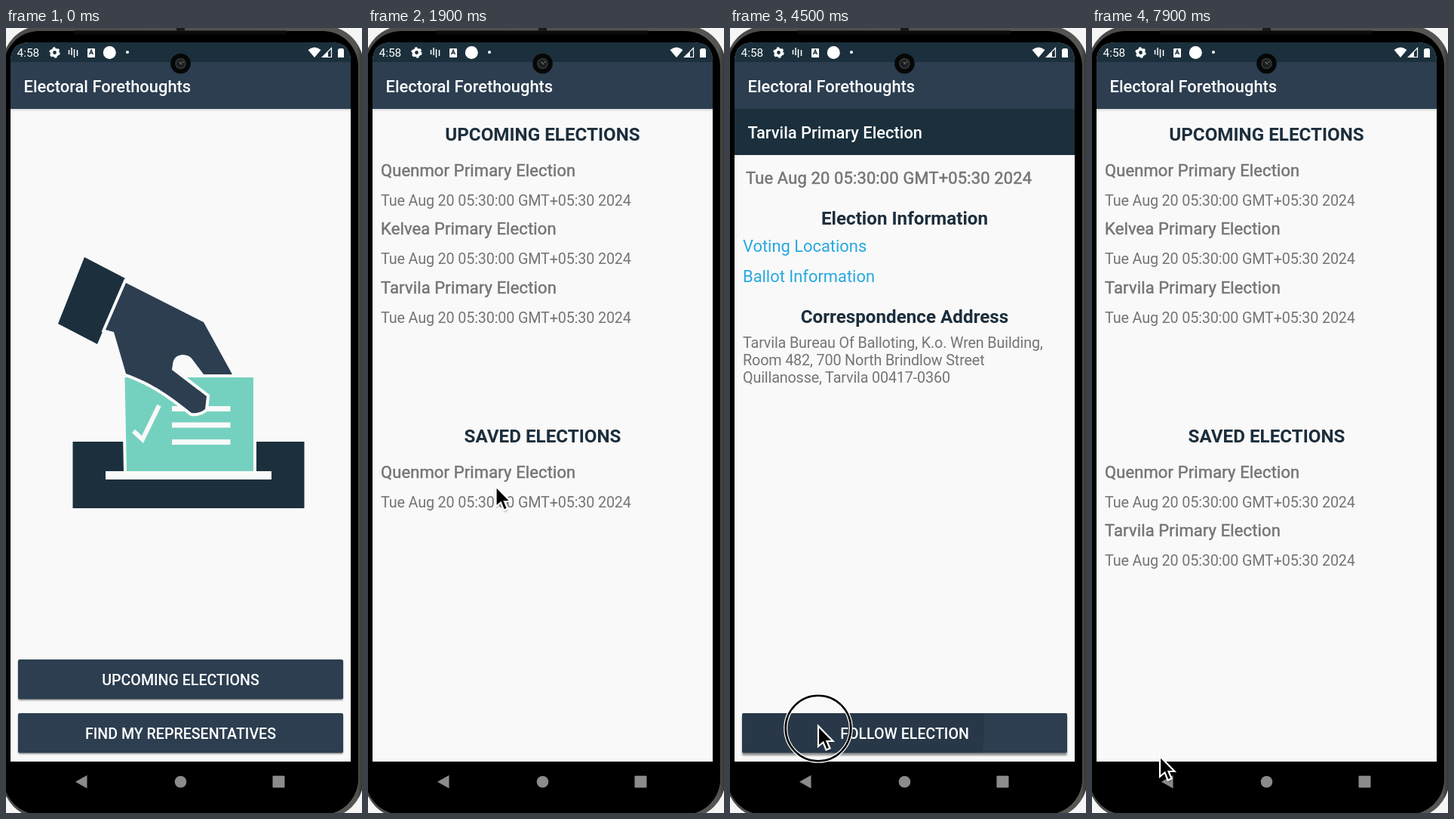
These frames come from a looping animation (472x1038 px, 8 s). An HTML page:

```html
<!DOCTYPE html>
<html lang="en">
<head>
<meta charset="utf-8">
<title>Election app walkthrough</title>
<style>
html, body { margin: 0; width: 100%; height: 100%; overflow: hidden; background: #f5f5f5; }
svg { display: block; width: 100%; height: 100%; font-family: Roboto, sans-serif; }
text { white-space: pre; }
.title { font-size: 21.9px; font-weight: 500; fill: #fff; }
.label { font-size: 19.6px; font-weight: 500; fill: #fff; text-anchor: middle; }
.head { font-size: 24.2px; font-weight: 700; fill: #1c2e3c; text-anchor: middle; }
.link { font-size: 21.9px; fill: #27a9e0; }
.body { font-size: 19.75px; fill: #757575; letter-spacing: -.15px; }
.strong { font-size: 21.9px; fill: #757575; stroke: #757575; stroke-width: .5px; letter-spacing: .17px; }
</style>
</head>
<body>
<svg id="stage" viewBox="0 0 472 1038" preserveAspectRatio="none">
  <defs>
    <linearGradient id="rim" x1="0" x2="1">
      <stop offset="0" stop-color="#30312f"/><stop offset=".02" stop-color="#4b4c4a"/>
      <stop offset=".98" stop-color="#555653"/><stop offset="1" stop-color="#2f302e"/>
    </linearGradient>
    <linearGradient id="drop" x1="0" x2="0" y1="0" y2="1">
      <stop offset="0" stop-color="#000" stop-opacity=".13"/><stop offset="1" stop-color="#000" stop-opacity="0"/>
    </linearGradient>
    <clipPath id="screen"><path d="M6 970V45Q6 19 32 19H431Q457 19 457 45V970Z"/></clipPath>
    <filter id="soft" x="-10%" y="-40%" width="120%" height="190%"><feGaussianBlur stdDeviation="1.3"/></filter>
    <filter id="blur" x="-50%" y="-50%" width="200%" height="200%"><feGaussianBlur stdDeviation="1.6"/></filter>
  </defs>

  <rect width="472" height="1038" fill="#f5f5f5"/>
  <rect x="-5" y="-3" width="479" height="1048" rx="52" fill="url(#rim)"/>
  <rect x="-3" y="4" width="470" height="1036" rx="47" fill="#000"/>
  <path d="M90 6H372" stroke="#0b0b0b" stroke-width="5"/>
  <rect x="226" width="11" height="4" fill="#191919"/>

  <g clip-path="url(#screen)">
    <rect x="6" y="19" width="451" height="951" fill="#f9f9f9"/>
    <g id="pages"></g>
    <rect x="6" y="19" width="451" height="88" fill="#2c3e50"/>
    <rect x="6" y="19" width="451" height="26" fill="#1b303c"/>
    <text class="title" x="23.5" y="85">Electoral Forethoughts</text>
  </g>

  <g fill="#fff">
    <text x="14.5" y="38" font-size="15.4">4:58</text>
    <circle cx="64.5" cy="32.5" r="4.2" fill="none" stroke="#fff" stroke-width="3.6"/>
    <circle cx="64.5" cy="32.5" r="6.2" fill="none" stroke="#fff" stroke-width="2" stroke-dasharray="3.2 3.3"/>
    <path d="M83.5 29V35M87 26V36M90.5 28V39M94.5 29V37" stroke="#fff" stroke-width="1.5"/>
    <rect x="108" y="27" width="10" height="12" rx="1"/>
    <path d="M110.5 35L113 29L115.5 35M111.5 33H114.5" fill="none" stroke="#1b303c" stroke-width="1.3"/>
    <circle cx="137.3" cy="32.5" r="8.5"/>
    <circle cx="161" cy="32" r="2"/>
    <path d="M400.5 29Q409 22 417.5 29L409 39Z"/>
    <path d="M419.5 38.5H431.5V26.5Z" fill="none" stroke="#fff" stroke-width="1.2"/>
    <path d="M419 39L427 31V39Z"/>
    <path d="M440 28.5L442 27H447L448 29V39H440Z"/>
  </g>
  <circle cx="231.5" cy="47" r="13.3" fill="#060707"/>
  <circle cx="231.5" cy="47" r="6.5" fill="#1c1e1f" stroke="#363939" stroke-width="1.5"/>
  <path d="M230 45L233 48M234 44L235 46" stroke="#687070" stroke-width="1.5"/>

  <g fill="#8b8b8b">
    <path d="M92 996.7L107.5 988V1005.5Z"/>
    <circle cx="231.5" cy="996.7" r="7.8"/>
    <rect x="353.5" y="988.8" width="16" height="15.7" rx="1"/>
  </g>

  <g id="ring" fill="none">
    <circle r="43.3" stroke="#fff" stroke-width="5"/>
    <circle r="43.3" stroke="#000" stroke-width="2.6"/>
  </g>
  <g id="cursor">
    <path d="M0 2V29L6.5 23.5L11 34L16 32L11.5 22H20Z" opacity=".3" filter="url(#blur)"/>
    <path d="M0 0V27L6.5 21.5L10.5 31.5L15.5 29.5L11.5 20H19.5Z" stroke="#fff" stroke-width="2.2"/>
  </g>
</svg>
<script>
const LOOP = 8000, STEP = 100, MID = 231.5;
const $ = id => document.getElementById(id);
const [FIRST, SECOND, THIRD] = ["Quenmor", "Kelvea", "Tarvila"].map(s => s + " Primary Election");
const DATE = "Tue Aug 20 05:30:00 GMT+05:30 2024";

const text = (cls, x, y, s, id = "") =>
  `<text class="${cls}" x="${x}" y="${y}"${id && ` id="${id}"`}>${s}</text>`;

const button = (id, y, label) => `
  <rect id="${id}Shade" x="16" y="${y + 1.5}" width="431" height="52.5" rx="2" opacity=".4" filter="url(#soft)"/>
  <rect x="16" y="${y}" width="431" height="52.5" rx="2" fill="#2c3e50"/>
  <clipPath id="${id}Clip"><rect x="16" y="${y}" width="431" height="52.5" rx="2"/></clipPath>
  <circle id="${id}Ripple" clip-path="url(#${id}Clip)" fill="#1f2c36"/>
  ${text("label", MID, y + 34, label, id + "Label")}`;

const row = (y, name) => text("strong", 17, y, name) + text("body", 17, y + 39, DATE);
const rows = (y, names) => names.map((n, i) => row(y + i * 77.8, n)).join("");
const group = (id, content) => `<g id="${id}">${content}</g>`;
const barShadow = `<rect x="6" y="107" width="451" height="4" fill="url(#drop)"/>`;

const artwork = `
  <path d="M104 303L158 331L121 418L69 391Z" fill="#1b303c"/>
  <rect x="88.5" y="547" width="307" height="88" fill="#1b303c"/>
  <path d="M153.5 458H332V588H156Z" fill="#f9f9f9"/>
  <path d="M157.5 462H328V586H160Z" fill="#75d1bf"/>
  <path d="M220 503.5H297.5M220 525H297.5M220 547.5H297.5" stroke="#f9f9f9" stroke-width="7"/>
  <path d="M169 533L181 544L203 499" fill="none" stroke="#f9f9f9" stroke-width="6"/>
  <path d="M159 337L262 389L300 458H262L247 438Q243 432 234 432Q222 433 221 445L220 452L266 487L264 504
    Q257 510 246 509C221 489 196 470 159 457L143 402L132 399Z"
    fill="#2c3e50" stroke="#f9f9f9" stroke-width="8" paint-order="stroke"/>
  <rect x="132" y="586" width="220" height="11" fill="#f9f9f9"/>`;

const address = [
  "Tarvila Bureau Of Balloting, K.o. Wren Building,",
  "Room 482, 700 North Brindlow Street",
  "Quillanosse, Tarvila 00417-0360"
];

$("pages").innerHTML =
  group("home", barShadow + artwork
    + button("open", 835, "UPCOMING ELECTIONS")
    + button("find", 906, "FIND MY REPRESENTATIVES"))
  + group("list", barShadow
    + text("head", MID, 149, "UPCOMING ELECTIONS")
    + text("head", MID, 548, "SAVED ELECTIONS")
    + group("loaded", rows(195.5, [FIRST, SECOND, THIRD]) + row(594.5, FIRST))
    + group("saved", row(672.3, THIRD)))
  + group("detail", `<rect x="6" y="107" width="451" height="61" fill="#1b303c"/>`
    + text("head", MID, 260, "Election Information")
    + text("link", 17, 295.5, "Voting Locations")
    + text("link", 17, 336, "Ballot Information")
    + text("head", MID, 390, "Correspondence Address")
    + text("body", 17, 423, "No address found", "missing")
    + group("info", text("title", 23.5, 146, THIRD)
      + text("strong", 21, 206, DATE)
      + address.map((s, i) => text("body", 17, 423 + i * 23.1, s)).join(""))
    + button("follow", 906, "FOLLOW ELECTION"));

// time, x, y of the pointer tip
const path = [
  [0, 500, 640], [300, 500, 640], [800, 245, 867], [1600, 245, 867], [2200, 94, 345],
  [3300, 94, 345], [4200, 117, 923], [5100, 117, 923], [5700, 160, 191], [6100, 188, -50],
  [7400, 200, -50], [7500, 175, 76], [7900, 90, 963], [8000, 90, 963]
];
const clicks = [800, 2200, 4400];

function pointer(t) {
  const i = path.findIndex(k => k[0] > t);
  const [t0, x0, y0] = path[i - 1], [t1, x1, y1] = path[i];
  const u = (t - t0) / (t1 - t0), e = u * u * (3 - 2 * u);
  return [x0 + (x1 - x0) * e, y0 + (y1 - y0) * e];
}

const show = (id, on) => $(id).setAttribute("display", on ? "inline" : "none");
const within = (t, a, b) => t >= a && t < b;

function press(id, x, y, age) {
  const on = within(age, 0, 500), ripple = $(id + "Ripple"), shade = $(id + "Shade");
  show(id + "Ripple", on);
  ripple.setAttribute("cx", x);
  ripple.setAttribute("cy", y);
  ripple.setAttribute("r", Math.max(0, 60 + age * 1.6));
  ripple.setAttribute("opacity", .3 * Math.min(1, Math.max(0, (500 - age) / 300)));
  shade.setAttribute("transform", `translate(0 ${on ? 2 : 0})`);
}

function draw(t) {
  const home = t < 1000, detail = within(t, 2400, 6400);
  show("home", home);
  show("detail", detail);
  show("list", !home && !detail);
  show("loaded", t >= 1200);
  show("saved", t >= 6600);
  show("info", t >= 3000);
  show("missing", t < 3000);
  $("followLabel").textContent = t < 4700 ? "FOLLOW ELECTION" : "UNFOLLOW ELECTION";
  press("open", 245, 867, t - 800);
  press("follow", 117, 926, t - 4400);

  const [x, y] = pointer(t);
  $("cursor").setAttribute("transform", `translate(${x} ${y})`);
  $("ring").setAttribute("transform", `translate(${x} ${y + 3})`);
  show("ring", clicks.some(c => within(t, c, c + 200)));
}

const start = performance.now();
function tick() {
  const t = (performance.now() - start) % LOOP;
  draw(Math.floor(t / STEP) * STEP);
  requestAnimationFrame(tick);
}
tick();
</script>
</body>
</html>
```
